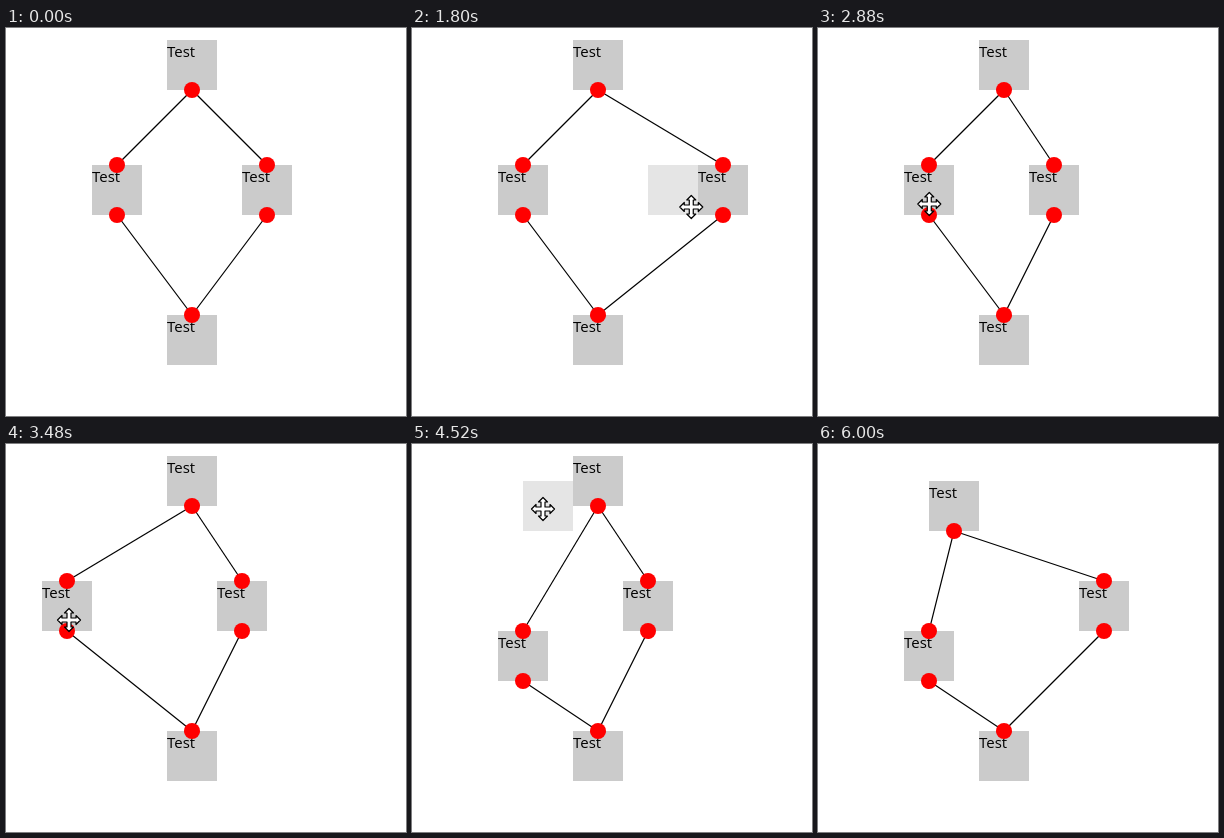
These frames come from a looping animation (400x388 px, 6040 ms). An HTML page:

```html
<!DOCTYPE html>
<html lang="en">
<head>
<meta charset="utf-8">
<title>Node editor</title>
<style>
  html, body { margin: 0; width: 100%; height: 100%; overflow: hidden; background: #fff; }
  svg { display: block; width: 400px; height: 388px; }
  text { font: 15px "Open Sans", "Noto Sans", sans-serif; }
  .box { fill: #cbcbcb; }
  .port { fill: #f00; }
  .edge { stroke: #000; stroke-width: 1.2; }
  .cursor { fill: #fff; stroke: #000; stroke-width: 1.2; stroke-linejoin: round; }
</style>
</head>
<body>
<svg id="stage" viewBox="0 0 400 388"></svg>
<script>
const LOOP = 6040, STEP = 40, SIZE = 50, HALF = SIZE / 2, GRID = 25;
const TOP = 0, LEFT = 1, RIGHT = 2, BOTTOM = 3;

const START = [[161, 12], [86, 137], [236, 137], [161, 287]];
const EDGES = [[TOP, LEFT], [TOP, RIGHT], [LEFT, BOTTOM], [RIGHT, BOTTOM]];

// The pointer comes in, makes these drags one after another, and leaves.
// "by" is in grid cells, "grip" is where the pointer holds the node.
const ENTER = { time: 240, pos: [392, 384] };
const LEAVE = { time: 5960, pos: [268, 384] };
const DRAGS = [
  { node: RIGHT, grab: 800, drop: 1240, by: [2, 0], grip: [35, 37] },
  { node: RIGHT, grab: 1520, drop: 2360, by: [-3, 0], grip: [37, 42] },
  { node: LEFT, grab: 2840, drop: 3440, by: [-2, 0], grip: [27, 39] },
  { node: LEFT, grab: 3480, drop: 3800, by: [2, 2], grip: [27, 39] },
  { node: TOP, grab: 4160, drop: 4640, by: [-2, 1], grip: [20, 28] },
  { node: RIGHT, grab: 5040, drop: 5560, by: [2, 0], grip: [19, 28] }
];
const DRAG_SHARE = 0.6; // the rest of a drag is a pause before the drop

const stage = document.getElementById("stage");

function set(el, attrs) {
  for (const key in attrs) el.setAttribute(key, attrs[key]);
  return el;
}

function add(tag, attrs, parent = stage) {
  const el = document.createElementNS("http://www.w3.org/2000/svg", tag);
  return parent.appendChild(set(el, attrs));
}

// One arm of the move cursor, turned four times
function crossPath() {
  let arm = [[-2, -2], [-2, -7], [-4.5, -7], [0, -11.5], [4.5, -7], [2, -7]];
  const points = [];
  for (let i = 0; i < 4; i++) {
    points.push(...arm);
    arm = arm.map(([x, y]) => [-y, x]);
  }
  return "M" + points.join("L") + "Z";
}

const ghost = add("rect", { class: "box", width: SIZE, height: SIZE, opacity: 0.5 });
const nodes = START.map(() => {
  const g = add("g", {});
  add("rect", { class: "box", width: SIZE, height: SIZE }, g);
  add("text", { x: 0, y: 17 }, g).textContent = "Test";
  return g;
});
const lines = EDGES.map(() => add("line", { class: "edge" }));
const ports = START.map((_, i) => {
  const g = add("g", {});
  if (i !== TOP) add("circle", { class: "port", cx: HALF, cy: 0, r: 8 }, g);
  if (i !== BOTTOM) add("circle", { class: "port", cx: HALF, cy: SIZE, r: 8 }, g);
  return g;
});
const arrow = add("path", { class: "cursor", d: "M0 0V16.5L3.8 13L6.3 19L9.3 17.8L6.8 12H12Z" });
const cross = add("path", { class: "cursor", d: crossPath() });

const plus = (a, b) => a.map((v, k) => v + b[k]);
const snap = v => Math.round(v / GRID) * GRID;

function glide(a, b, t, from, to) {
  const p = Math.min(1, Math.max(0, (t - from) / (to - from)));
  const e = p * p * (3 - 2 * p);
  return a.map((v, k) => v + (b[k] - v) * e);
}

function stateAt(t) {
  const at = [...START];
  let { time, pos } = ENTER;
  for (const { node, grab, drop, by, grip } of DRAGS) {
    const home = at[node], shift = by.map(v => v * GRID);
    const hold = plus(home, grip);
    if (t < grab) return { at, pointer: glide(pos, hold, t, time, grab) };

    if (t < drop) {
      const done = glide([0, 0], shift, t, grab, grab + (drop - grab) * DRAG_SHARE);
      return { at, pointer: plus(hold, done), held: plus(home, done.map(snap)) };
    }
    at[node] = plus(home, shift);
    pos = plus(hold, shift);
    time = drop;
  }
  return { at, pointer: glide(pos, LEAVE.pos, t, time, LEAVE.time) };
}

const move = (el, [x, y]) => set(el, { transform: `translate(${x} ${y})` });
const show = (el, on) => set(el, { visibility: on ? "visible" : "hidden" });

function draw(t) {
  const { at, pointer, held } = stateAt(t);

  at.forEach((p, i) => {
    move(nodes[i], p);
    move(ports[i], p);
  });
  EDGES.forEach(([a, b], i) => set(lines[i], {
    x1: at[a][0] + HALF, y1: at[a][1] + SIZE,
    x2: at[b][0] + HALF, y2: at[b][1]
  }));

  show(ghost, held);
  if (held) move(ghost, held);

  const visible = t >= ENTER.time && t < LEAVE.time;
  const over = held || at.some(p => p.every((v, k) => pointer[k] >= v && pointer[k] <= v + SIZE));
  move(show(arrow, visible && !over), pointer);
  move(show(cross, visible && over), pointer);
}

const begin = performance.now();
function tick() {
  const t = (performance.now() - begin) % LOOP;
  draw(Math.floor(t / STEP) * STEP);
  requestAnimationFrame(tick);
}
tick();
</script>
</body>
</html>
```
